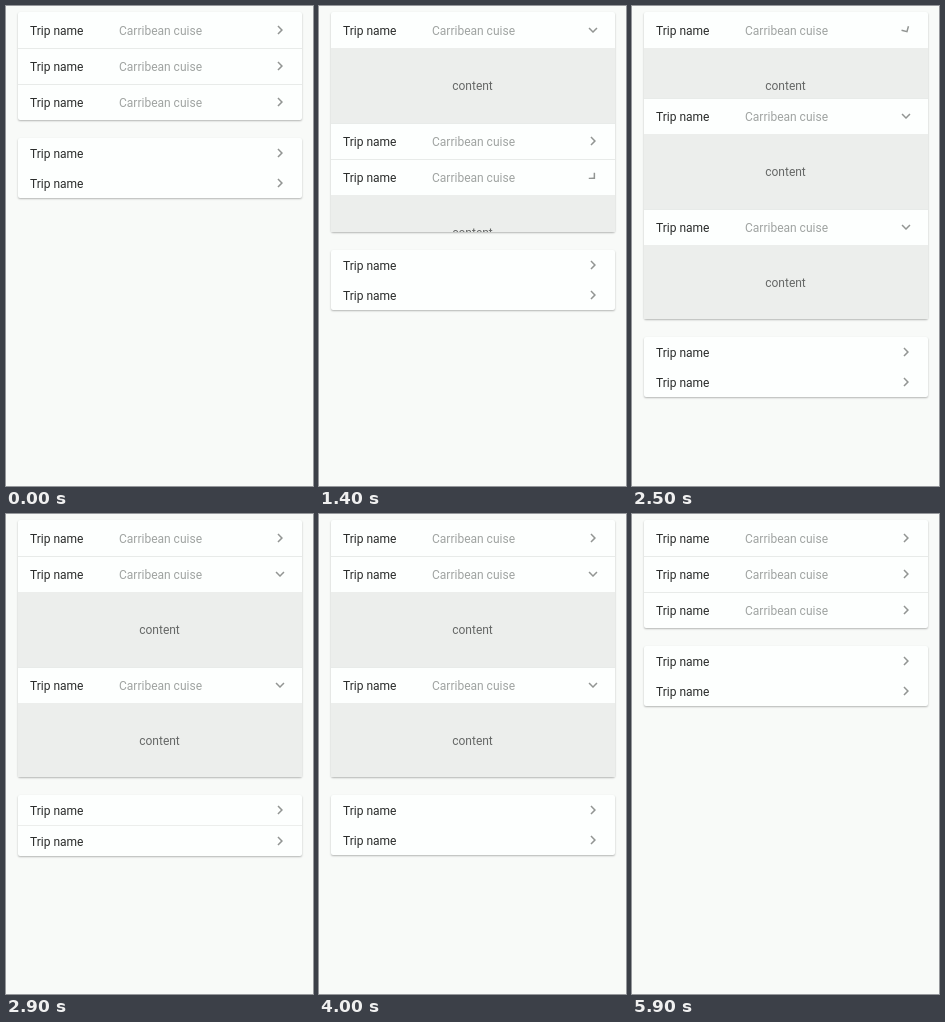
An HTML page that plays this animation: 307x480 px, repeating every 6300 ms.

```html
<!DOCTYPE html>
<html lang="en">
<head>
<meta charset="utf-8">
<title>Trip accordion</title>
<style>
@property --open { syntax: "<number>"; inherits: true; initial-value: 0; }

html, body { margin: 0; width: 100%; height: 100%; overflow: hidden; }
body { display: flow-root; background: #f8faf8; font: 12px Roboto, sans-serif; color: #2b2d2c; }

.card {
  width: 284px;
  margin: 0 auto 18px;
  border-radius: 2px;
  background: #fdfffe;
  box-shadow: 0 1px 2px rgba(0, 0, 0, .28);
}
.lined { margin-top: 6px; }

.row { position: relative; height: 36px; line-height: 36px; }
.row span { position: absolute; left: 12.5px; top: 1px; white-space: nowrap; }
.row .note { left: 101.5px; color: #a0a4a2; }
.row svg {
  position: absolute;
  left: 253.5px;
  top: calc(50% - 9px);
  width: 18px;
  height: 18px;
  fill: #929593;
  transform: rotate(calc(var(--open) * 90deg));
}
.lined .item + .item .row { box-shadow: inset 0 1px #e8ebe9; }

.item { --full: 74.5px; animation: 6300ms ease-in-out infinite; }
.panel {
  height: calc(var(--open) * var(--full));
  overflow: hidden;
  background: #eceeec;
  color: #666867;
  text-align: center;
  line-height: calc(var(--full) + 2px);
}

.short .row { height: 30px; line-height: 30px; }
.short .item { --full: 149px; }
.short .panel { color: #2b2d2c; }

/* each item opens and closes once per loop, 360 ms per move */
.a { animation-name: a; }
.b { animation-name: b; }
.c { animation-name: c; }
.d { animation-name: d; }
@keyframes a {
  0%, 6.032%, 43.143%, 100% { --open: 0; }
  11.746%, 37.429% { --open: 1; }
}
@keyframes b {
  0%, 28.413%, 93.889%, 100% { --open: 0; }
  34.127%, 88.175% { --open: 1; }
}
@keyframes c {
  0%, 19.381%, 84.762%, 100% { --open: 0; }
  25.095%, 79.048% { --open: 1; }
}
@keyframes d {
  0%, 45.714%, 62.54%, 100% { --open: 0; }
  51.429%, 56.825% { --open: 1; }
}
</style>
</head>
<body>
<svg width="0" height="0" style="position:absolute">
  <symbol id="chevron" viewBox="0 0 24 24"><path d="M10 6 8.59 7.41 13.17 12l-4.58 4.59L10 18l6-6z"/></symbol>
</svg>
<div class="card lined">
  <div class="item a">
    <div class="row"><span>Trip name</span><span class="note">Carribean cuise</span><svg><use href="#chevron"/></svg></div>
    <div class="panel">content</div>
  </div>
  <div class="item b">
    <div class="row"><span>Trip name</span><span class="note">Carribean cuise</span><svg><use href="#chevron"/></svg></div>
    <div class="panel">content</div>
  </div>
  <div class="item c">
    <div class="row"><span>Trip name</span><span class="note">Carribean cuise</span><svg><use href="#chevron"/></svg></div>
    <div class="panel">content</div>
  </div>
</div>
<div class="card short">
  <div class="item d">
    <div class="row"><span>Trip name</span><svg><use href="#chevron"/></svg></div>
    <div class="panel">Content</div>
  </div>
  <div class="item">
    <div class="row"><span>Trip name</span><svg><use href="#chevron"/></svg></div>
  </div>
</div>
</body>
</html>
```
